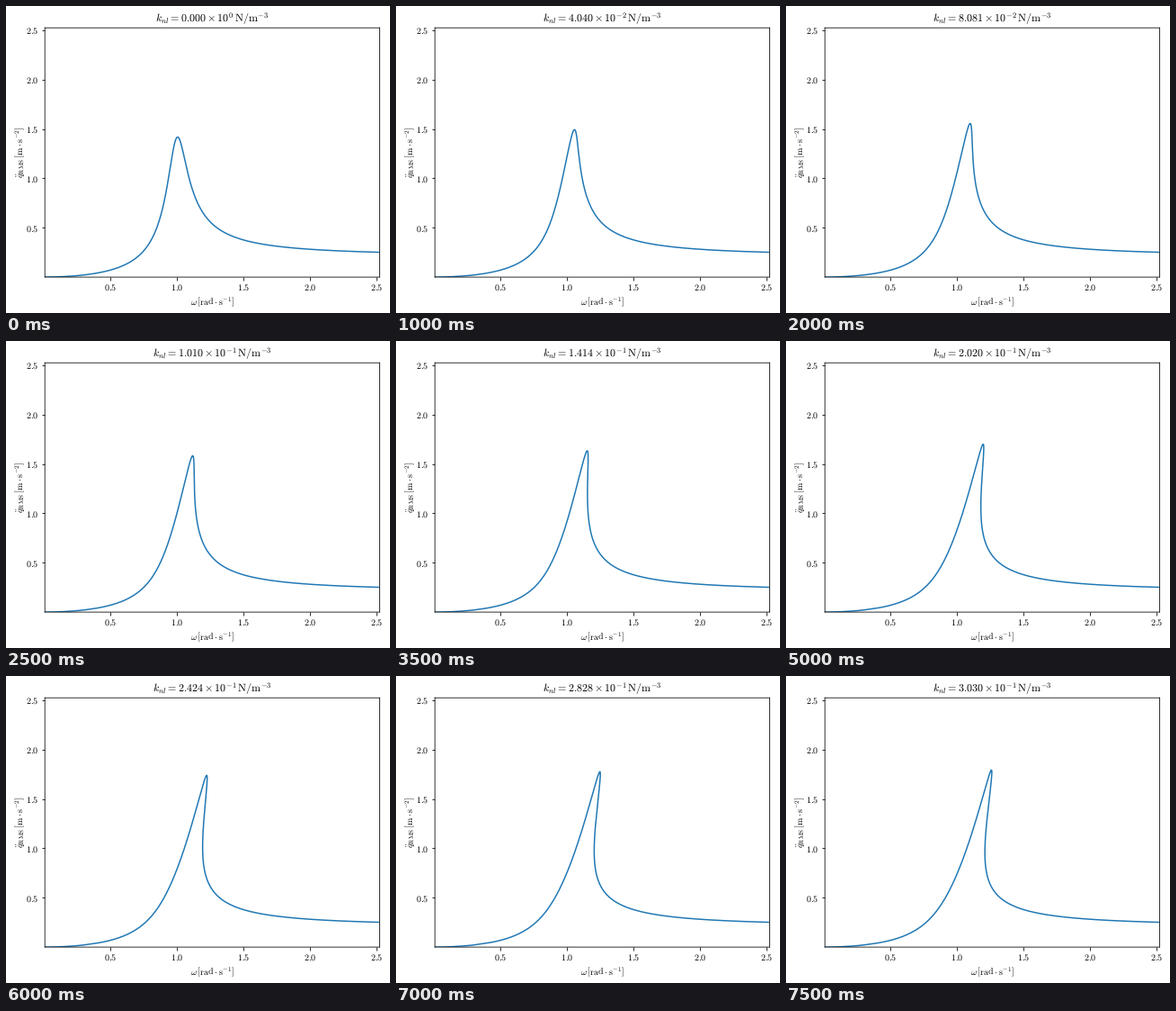
These frames come from a looping animation (427 by 341 pixels, 8000 ms). A matplotlib script:

```python
import numpy as np
import matplotlib.pyplot as plt
from matplotlib.animation import FuncAnimation

W, H, DPI = 427, 341, 72
FRAMES, INTERVAL = 16, 500
DAMPING, FORCE = 0.15, 0.3

plt.rcParams.update({"mathtext.fontset": "cm", "font.size": 10,
                     "text.hinting": "none"})


def phase_grid():
    """Phase lags, dense both along the frequency axis and through resonance."""
    w = np.linspace(0.004, 2.6, 600)
    return np.sort(np.r_[np.arctan2(DAMPING * w, 1 - w**2),
                         np.linspace(0.1, 3.0, 500)])


PHASE = phase_grid()


def response(knl):
    """Duffing oscillator, harmonic balance with harmonics 1 and 3."""
    cot = 1 / np.tan(PHASE)
    amp = np.zeros_like(PHASE)
    third = np.zeros_like(PHASE, dtype=complex)
    for _ in range(80):
        stiff = 0.75 * knl * (amp**2 + amp * third.real + 2 * abs(third)**2)
        loss = 0.75 * knl * amp * third.imag
        p = DAMPING * cot
        w = (-p + np.sqrt(p**2 + 4 * (1 + stiff - loss * cot))) / 2
        new_amp = FORCE * np.sin(PHASE) / (DAMPING * w + loss)
        amp = 0.3 * amp + 0.7 * new_amp
        z3 = (1 - 9 * w**2 + 3j * DAMPING * w
              + 0.75 * knl * (2 * amp**2 + abs(third)**2))
        third = 0.3 * third - 0.7 * knl * amp**3 / 4 / z3
    rms = w**2 * np.sqrt((amp**2 + 81 * abs(third)**2) / 2)
    return w, rms


def title_text(knl):
    mantissa, exponent = f"{knl:.3e}".split("e")
    return (rf"$k_{{nl}} = {mantissa} \times 10^{{{int(exponent)}}}"
            r"\,\mathrm{N/m}^{-3}$")


fig = plt.figure(figsize=(W / DPI, H / DPI), dpi=DPI, facecolor="white")
left, right, top, bottom = 43.2, 415.4, 24.2, 301.1
ax = fig.add_axes([left / W, 1 - bottom / H, (right - left) / W, (bottom - top) / H])
ax.set(xlim=(0.01, 2.52), ylim=(0, 2.525))
for spine in ax.spines.values():
    spine.set_snap(False)

ticks = np.arange(0.5, 2.6, 0.5)
labels = [f"${t:.1f}$" for t in ticks]
ax.set_xticks(ticks, labels)
ax.set_yticks(ticks, labels)
ax.tick_params(axis="x", pad=2.8)

mid_x, mid_y = (left + right) / 2, (top + bottom) / 2
fig.text(mid_x / W, 1 - 331 / H, r"$\omega\,[\mathrm{rad}\cdot\mathrm{s}^{-1}]$",
         ha="center", va="baseline")
fig.text(18.5 / W, 1 - mid_y / H,
         r"$\ddot{q}_{\mathrm{RMS}}\,[\mathrm{m}\cdot\mathrm{s}^{-2}]$",
         rotation=90, rotation_mode="anchor", ha="center", va="baseline")

title = ax.set_title("", fontsize=12, pad=6)
line, = ax.plot([], [], color="#1f77b4", lw=1.5)


def update(i):
    knl = 2 * i / 99
    line.set_data(*response(knl))
    title.set_text(title_text(knl))
    return line, title


anim = FuncAnimation(fig, update, frames=FRAMES, interval=INTERVAL,
                     repeat=True, repeat_delay=0, blit=False)
plt.show()
```
